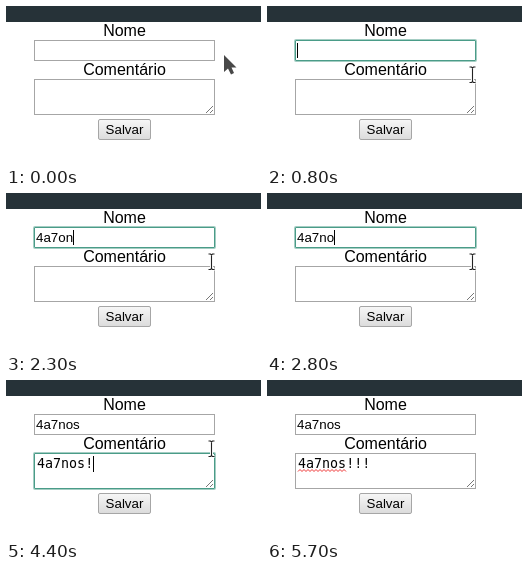
Animation of 255 by 159 pixels, one loop 5.8 s. Source, as an HTML page:

```html
<!DOCTYPE html>
<html lang="pt">
<head>
<meta charset="utf-8">
<title>Formulário</title>
<style>
html, body { margin: 0; width: 100%; height: 100%; overflow: hidden; background: #fff; }
#stage {
  position: relative; width: 255px; height: 159px; overflow: hidden;
  background: #fff; color: #000; font: 16px "Liberation Sans", Arial, sans-serif;
}
#stage > * { position: absolute; box-sizing: border-box; white-space: pre; }
.bar { left: 0; top: 0; width: 255px; height: 16px; background: #263238; }
.label { left: 0; width: 237px; text-align: center; line-height: 18px; }
.field { left: 28px; width: 181px; border: 1px solid #a6a6a6; background: #fff; }
.field.focus { border-color: #4a9c88; border-radius: 1px; box-shadow: 0 0 0 1px rgba(74, 156, 136, .5); }
.value { position: absolute; top: 2px; font-size: 13.333px; line-height: 15px; }
#name .value { left: 1px; }
#note .value { left: 2px; font-family: "DejaVu Sans Mono", monospace; line-height: 16px; }
.focus .value::after {
  content: ""; position: absolute; left: 100%; top: 0; width: 1px; height: 100%; background: #000;
}
.button {
  left: 92px; top: 113px; width: 53px; height: 21px; border: 1px solid #a6a6a6; border-radius: 2px;
  background: linear-gradient(#f6f6f6, #dcdcdc); font-size: 13.333px; line-height: 19px;
  display: flex; justify-content: center;
}
svg { left: 0; top: 0; }
</style>
</head>
<body>
<div id="stage">
  <div class="bar"></div>
  <div class="label" style="top:16px">Nome</div>
  <div class="field" id="name" style="top:34px;height:21px"><span class="value"></span></div>
  <div class="label" style="top:55px">Comentário</div>
  <div class="field" id="note" style="top:73px;height:36px"><span class="value"></span></div>
  <div class="button">Salvar</div>
  <svg width="255" height="159" fill="none">
    <path d="M200 107l7-7M204 107l3-3" stroke="#777"/>
    <path id="wave" stroke="#e33" stroke-width="1"/>
    <g id="arrow">
      <path d="M0 0V17L4 13.5L7 19.5L10 18L7.5 12.5H12.5Z" fill="#484848" stroke="#fff" stroke-width="1.6" paint-order="stroke"/>
    </g>
    <g id="beam">
      <path d="M-3-7.5H-1L0-6.5L1-7.5H3M0-6.5V7M-3 8H-1L0 7L1 8H3" stroke="#fff" stroke-width="3"/>
      <path d="M-3-7.5H-1L0-6.5L1-7.5H3M0-6.5V7M-3 8H-1L0 7L1 8H3" stroke="#222" stroke-width="1.1"/>
    </g>
  </svg>
</div>
<script>
const LOOP = 5800;
const $ = id => document.getElementById(id);

// Each track lists [start in ms, value]; values hold until the next entry.
const nameText = [
  [0, ""], [1200, "4"], [1500, "4a"], [1700, "4a7"], [2000, "4a7o"], [2300, "4a7on"],
  [2400, "4a7o"], [2500, "4a7"], [2600, "4a7n"], [2800, "4a7no"], [2900, "4a7nos"]
];
const noteText = [
  [0, ""], [3300, "4"], [3500, "4a"], [3700, "4a7"], [3800, "4a7n"], [4000, "4a7no"],
  [4200, "4a7nos"], [4400, "4a7nos!"], [4600, "4a7nos!!"], [4800, "4a7nos!!!"]
];
const focus = [[0, ""], [600, "name"], [3000, "note"], [5600, ""]];
const pointer = [
  [0, ["arrow", 218, 49]], [200, ["arrow", 200, 56]], [300, ["beam", 172, 46]], [400, ["beam", 150, 44]],
  [700, ["beam", 182, 54]], [800, ["beam", 205.5, 68.5]],
  [5200, ["arrow", 183, 65]], [5300, ["beam", 166, 88]], [5400, ["beam", 146, 97]],
  [5500, ["arrow", 130, 110]], [5700, ["", 0, 0]]
];
const spelling = [[0, false], [4500, true]];

const at = (track, t) => track.filter(step => step[0] <= t).pop()[1];

function setField(id, text, active) {
  const field = $(id);
  field.firstElementChild.textContent = text || "\u200b";
  field.classList.toggle("focus", active === id);
}

function draw(t) {
  const active = at(focus, t);
  setField("name", at(nameText, t), active);
  setField("note", at(noteText, t), active);
  $("wave").style.display = at(spelling, t) ? "" : "none";
  const [kind, x, y] = at(pointer, t);
  for (const id of ["arrow", "beam"]) {
    $(id).style.display = id === kind ? "" : "none";
    $(id).setAttribute("transform", `translate(${x} ${y})`);
  }
}

$("wave").setAttribute("d", "M31 91.5" + "l2-2l2 2".repeat(12));

const start = performance.now();
function tick(now) {
  draw(Math.max(0, now - start) % LOOP);
  requestAnimationFrame(tick);
}
draw(0);
requestAnimationFrame(tick);
</script>
</body>
</html>
```
